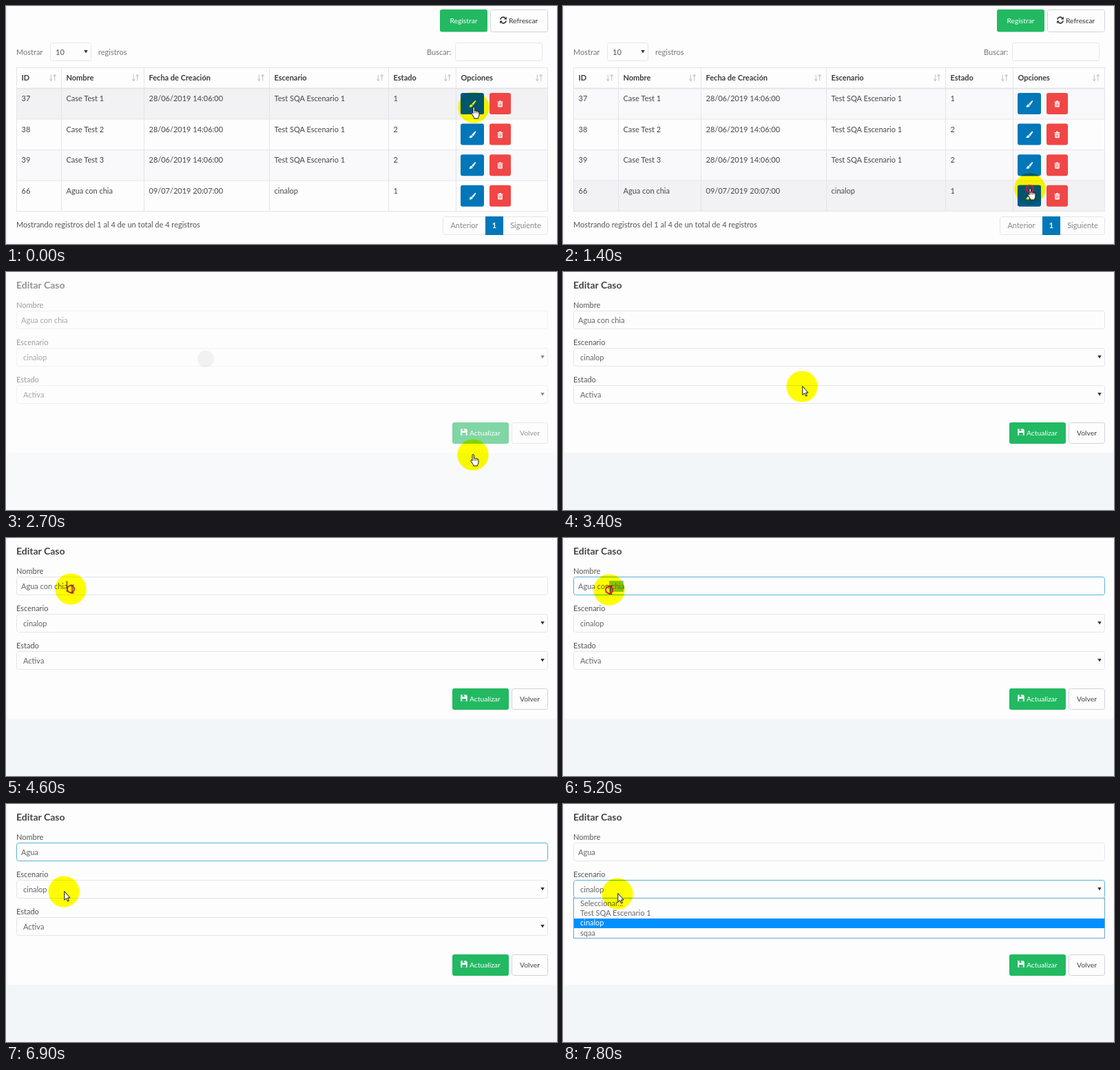
Animation, 800 px wide and 345 px high, one loop 8 s. Source, as an HTML page:

```html
<!DOCTYPE html>
<html lang="es">
<head>
<meta charset="utf-8">
<style>
html, body { margin: 0; width: 100%; height: 100%; overflow: hidden; background: #fff; }
svg { display: block; width: 800px; height: 345px; font: 11px Lato, sans-serif; }
text { white-space: pre; }
#spot { mix-blend-mode: multiply; }
</style>
</head>
<body>
<svg id="stage" viewBox="0 0 800 345"></svg>
<script>
const BLUE = '#0077b8', GREEN = '#22b962', RED = '#f04646', LINE = '#e4e5e9', FOCUS = '#58b2d6';
const SCENE = 'cinalop';

const text = (x, y, s, fill = '#484848', extra = '') => `<text x="${x}" y="${y}" fill="${fill}" ${extra}>${s}</text>`;
const box = (x, y, w, h, fill, stroke = 'none', r = 3, extra = '') =>
  `<rect x="${x}" y="${y}" width="${w}" height="${h}" rx="${r}" fill="${fill}" stroke="${stroke}" ${extra}/>`;
const path = (d, fill, extra = '') => `<path d="${d}" fill="${fill}" ${extra}/>`;
const at = (x, y, s, extra = '') => `<g transform="translate(${x} ${y})" ${extra}>${s}</g>`;
const small = 'font-size="10.3"', bold = 'font-weight="700"', mid = 'text-anchor="middle"';
const caretDown = (x, y) => path(`M${x - 2.7} ${y - 2}h5.4l-2.7 4.6z`, '#333');

const brush = c => path('M4.6-5Q5.7-4.8 5-3.4L1.5 1.8-.9.1 3.7-4.6ZM-1.3.8Q1 1.4.6 3-.6 5.4-5 4.2-3.6 3.6-3.5 2.2-3 .6-1.3.8Z', c);
const trash = path('M-4-3.6h2.3l.6-1.2h2.2l.6 1.2H4v1h-8zM-3.3-2h6.6v5.6q0 1-1 1h-4.6q-1 0-1-1z', '#fff') +
  path('M-1.6-1v4.3M0-1v4.3M1.6-1v4.3', 'none', `stroke="${RED}" stroke-width=".7"`);
const refresh = path('M-4.2-.8A4.2 4.2 0 0 1 3.2-2.8M4.2.8A4.2 4.2 0 0 1-3.2 2.8', 'none', 'stroke="#333" stroke-width="1.5"') +
  path('M4.9-5v4H.9zM-4.9 5v-4h4z', '#333');
const floppy = path('M-4.8-4.8h7.8l1.8 1.8v7.8h-9.6z', '#fff') +
  path('M-2.4-4.8h4v3h-4zM-2.8 1h5.6v3.8h-5.6z', GREEN) + path('M0-4.8h1.2v2.2h-1.2z', '#fff');
const sortIcon = path('M-2.7-4.5v9m-2-2.3 2 2.3 2-2.3M2.7 4.5v-9m-2 2.3 2-2.3 2 2.3', 'none', 'stroke="#cbcbd0" stroke-width="1.2"');

const cols = [15.5, 80.5, 200.5, 382.5, 555.5, 653.5, 786.5];
const edges = [119.5, 164, 208.5, 253, 297.5];
const heads = ['ID', 'Nombre', 'Fecha de Creación', 'Escenario', 'Estado', 'Opciones'];
const rows = [
  ['37', 'Case Test 1', '28/06/2019 14:06:00', 'Test SQA Escenario 1', '1'],
  ['38', 'Case Test 2', '28/06/2019 14:06:00', 'Test SQA Escenario 1', '2'],
  ['39', 'Case Test 3', '28/06/2019 14:06:00', 'Test SQA Escenario 1', '2'],
  ['66', 'Agua con chia', '09/07/2019 20:07:00', SCENE, '1'],
];
const rowY = i => 126 + i * 44.6;
const cellX = i => cols[i] + 7;
const brushButton = (i, fill, icon, extra = '') =>
  box(660, rowY(i), 34, 31, fill, 'none', 3, extra) + at(677, rowY(i) + 16, brush(icon));

function tablePage() {
  return box(0, 0, 800, 345, '#f3f5f8', 'none', 0) + box(2, -6, 797, 349.5, '#fefdfe') +
    box(630, 5, 69, 32.5, GREEN) + text(664.5, 25, 'Registrar', '#fff', `${small} ${mid}`) +
    box(703.5, 5.5, 83, 32, '#fefdfe', '#d0d3d8') + at(722, 20.5, refresh) + text(730, 25, 'Refrescar', '#333', small) +
    text(15, 71, 'Mostrar', '#777') + box(64.5, 53.5, 59, 26, '#fefdfe', LINE) + text(72, 71, '10', '#555') +
    caretDown(116, 66) + text(134, 71, 'registros', '#777') +
    text(611, 71, 'Buscar:', '#777') + box(652.5, 53.5, 126, 26, '#fefdfe', LINE) +
    rows.map((r, i) => box(15.5, edges[i], 771, edges[i + 1] - edges[i], '#fff', 'none', 0, 'class="row"')).join('') +
    path(`M15 89.5H787M15 119.5H787${edges.slice(1).map(y => `M15 ${y}H787`).join('')}` +
      cols.map(x => `M${x} 89V298`).join(''), 'none', `stroke="${LINE}"`) +
    path('M15 119.5H787', 'none', `stroke="${LINE}" stroke-width="2"`) +
    heads.map((h, i) => text(cellX(i), 108, h, '#3c3c3c', bold) + at(cols[i + 1] - 12.5, 104, sortIcon)).join('') +
    rows.map((r, i) => r.map((s, j) => text(cellX(j), 138 + i * 44.6, s)).join('') +
      brushButton(i, BLUE, '#fff', 'class="edit"') +
      box(702, rowY(i), 31, 31, RED) + at(717.5, rowY(i) + 16, trash)).join('') +
    text(15, 321, 'Mostrando registros del 1 al 4 de un total de 4 registros', '#555') +
    box(634.5, 305.5, 152, 26, '#fefdfe', LINE) + box(696, 305, 26, 27, BLUE, 'none', 0) +
    text(665.5, 322, 'Anterior', '#888', mid) + text(709, 322, '1', '#fff', `${mid} ${bold}`) +
    text(754.5, 322, 'Siguiente', '#888', mid);
}

const field = (y, id) => box(15.5, y, 771, 26, '#fefdfe', LINE, 3, `id="${id}"`);

function editPage() {
  return box(0, 0, 800, 345, '#f2f6f9', 'none', 0) + box(2, -6, 797, 268, '#fefdfe', 'none', 4) +
    text(15, 24, 'Editar Caso', '#444', `font-size="14" ${bold}`) +
    text(15, 52, 'Nombre', '#555') + field(56.5, 'name') +
    text(22, 74, '<tspan>Agua</tspan><tspan id="rest"> con chia</tspan>', '#666') +
    box(47, 62, 0, 16, '#3390ff', 'none', 0, 'id="select" opacity=".55"') +
    path('M0 62.5V78', 'none', 'id="caret" stroke="#222"') +
    text(15, 106, 'Escenario', '#555') + field(110.5, 'scene') + text(25, 128, SCENE, '#666') + caretDown(779, 123) +
    text(15, 160, 'Estado', '#555') + field(164.5, 'state') + text(25, 182, 'Activa', '#666') + caretDown(779, 177) +
    `<g id="menu">` + box(15.5, 136.5, 771, 58, '#fefdfe', '#6ba6c8', 0) + box(16, 166, 770, 14, '#0090ff', 'none', 0) +
    ['Seleccionar...', 'Test SQA Escenario 1', SCENE, 'sqaa'].map((s, i) =>
      text(25, 148 + i * 14.2, s, i == 2 ? '#fff' : '#666')).join('') + `</g>` +
    box(648, 218, 82, 31, GREEN) + at(665, 232, floppy) + text(673, 237, 'Actualizar', '#fff', small) +
    box(734.5, 218.5, 52, 30, '#fefdfe', '#d0d3d8') + text(760.5, 237, 'Volver', '#444', `${small} ${mid}`);
}

const ink = 'stroke="#111" stroke-width="1" stroke-linejoin="round"';
const cursors = {
  hand: path('M-1 7V.8Q-1-.6.2-.6T1.4.8V5Q3 4.2 3.6 5.4 5.2 4.8 5.8 6 8 5.6 8 7.6V11Q8 13 6.6 14.6V16H.6V14.6L-2.8 9.6Q-3.4 8-2.4 7.6T-1 8.6Z', '#fff', ink) +
    path('M1.4 5v3.5M3.6 5.6v3M5.8 6.2v2.6', 'none', 'stroke="#111" stroke-width=".7"'),
  arrow: path('M.8-.5V12.2L3.6 9.6 5.6 14 7.4 13.2 5.5 9H9Z', '#fff', ink),
  beam: path('M-.5-6Q2-6 2-5 2-6 4.5-6M2-5V5M-.5 6Q2 6 2 5 2 6 4.5 6', 'none', 'stroke="#222" stroke-width="1.2"'),
};

document.getElementById('stage').innerHTML =
  `<defs><clipPath id="lens"><circle class="disc" r="22.6"/></clipPath></defs>` + box(0, 0, 800, 345, '#fff', 'none', 0) +
  `<g id="table">${tablePage()}</g><g id="edit">${editPage()}</g>` +
  `<circle id="blob" cx="290" cy="126" r="12" fill="#777"/>` +
  `<circle id="spot" class="disc" r="22.6" fill="#ff0"/>` +
  `<g id="under" clip-path="url(#lens)">${rows.map((r, i) => brushButton(i, '#00566c', '#f4f000')).join('')}</g>` +
  `<g id="pointer">${Object.entries(cursors).map(([k, s]) => `<g id="${k}">${s}</g>`).join('')}` +
  `<circle id="ring" r="5" fill="none" stroke="#e0143c" stroke-width="2"/></g>`;

const $ = id => document.getElementById(id);
const all = s => [...document.querySelectorAll(s)];
const show = (id, on) => $(id).setAttribute('display', on ? 'inline' : 'none');
const within = (t, a, b) => t >= a && t < b;
const clamp = v => Math.max(0, Math.min(1, v));

// time, x, y of the pointer
const track = [
  [0, 679, 147], [300, 679, 147], [1000, 678, 265], [3000, 678, 265], [3400, 347, 166], [3900, 112, 82],
  [4300, 94, 74], [4600, 94, 74], [5600, 49, 76], [6100, 49, 76], [6600, 79, 105], [6900, 84, 127],
  [7000, 84, 127], [7400, 79, 130], [8000, 79, 130],
];
function pointerAt(t) {
  const i = track.findIndex(k => k[0] > t), [t0, x0, y0] = track[i - 1], [t1, x1, y1] = track[i];
  const p = (t - t0) / (t1 - t0);
  return [x0 + (x1 - x0) * p, y0 + (y1 - y0) * p];
}

function draw() {
  const t = Math.floor(performance.now() % 8000 / 100) * 100;
  const [x, y] = pointerAt(t);
  const onTable = t < 2200, fade = clamp((t - 2300) / 700);

  show('table', onTable);
  show('under', onTable);
  $('edit').setAttribute('opacity', onTable ? 0 : fade);
  $('blob').setAttribute('opacity', onTable ? 0 : .2 * (1 - fade));
  const hover = edges.findIndex(e => e > y) - 1;
  all('.row').forEach((r, i) => r.setAttribute('fill', i == hover ? '#f2f1f3' : i % 2 ? '#fefdfe' : '#f9f8fa'));
  all('.edit').forEach((b, i) => b.setAttribute('fill', Math.abs(y - rowY(i) - 15.5) < 16 ? '#005b8e' : BLUE));

  const open = t >= 7700, deleted = t >= 6100;
  $('name').setAttribute('stroke', within(t, 4700, 7700) ? FOCUS : LINE);
  $('scene').setAttribute('stroke', open ? FOCUS : LINE);
  show('menu', open);
  show('rest', !deleted);
  const left = Math.max(47, Math.min(88, x));
  $('select').setAttribute('x', left);
  $('select').setAttribute('width', within(t, 4700, 6100) ? 88 - left : 0);
  $('caret').setAttribute('transform', `translate(${deleted ? 47.5 : 88.5} 0)`);
  show('caret', within(t, 4600, 4800) || within(t, 6100, 6600) || within(t, 7100, 7400));

  all('.disc').forEach(c => { c.setAttribute('cx', x); c.setAttribute('cy', y); });
  $('pointer').setAttribute('transform', `translate(${x} ${y})`);
  const kind = t < 3100 ? 'hand' : within(y, 56, 83) ? 'beam' : 'arrow';
  Object.keys(cursors).forEach(k => show(k, k == kind));
  show('ring', within(t, 1400, 1900) || within(t, 4600, 5600) || within(t, 7200, 7400));
  requestAnimationFrame(draw);
}
draw();
</script>
</body>
</html>
```
